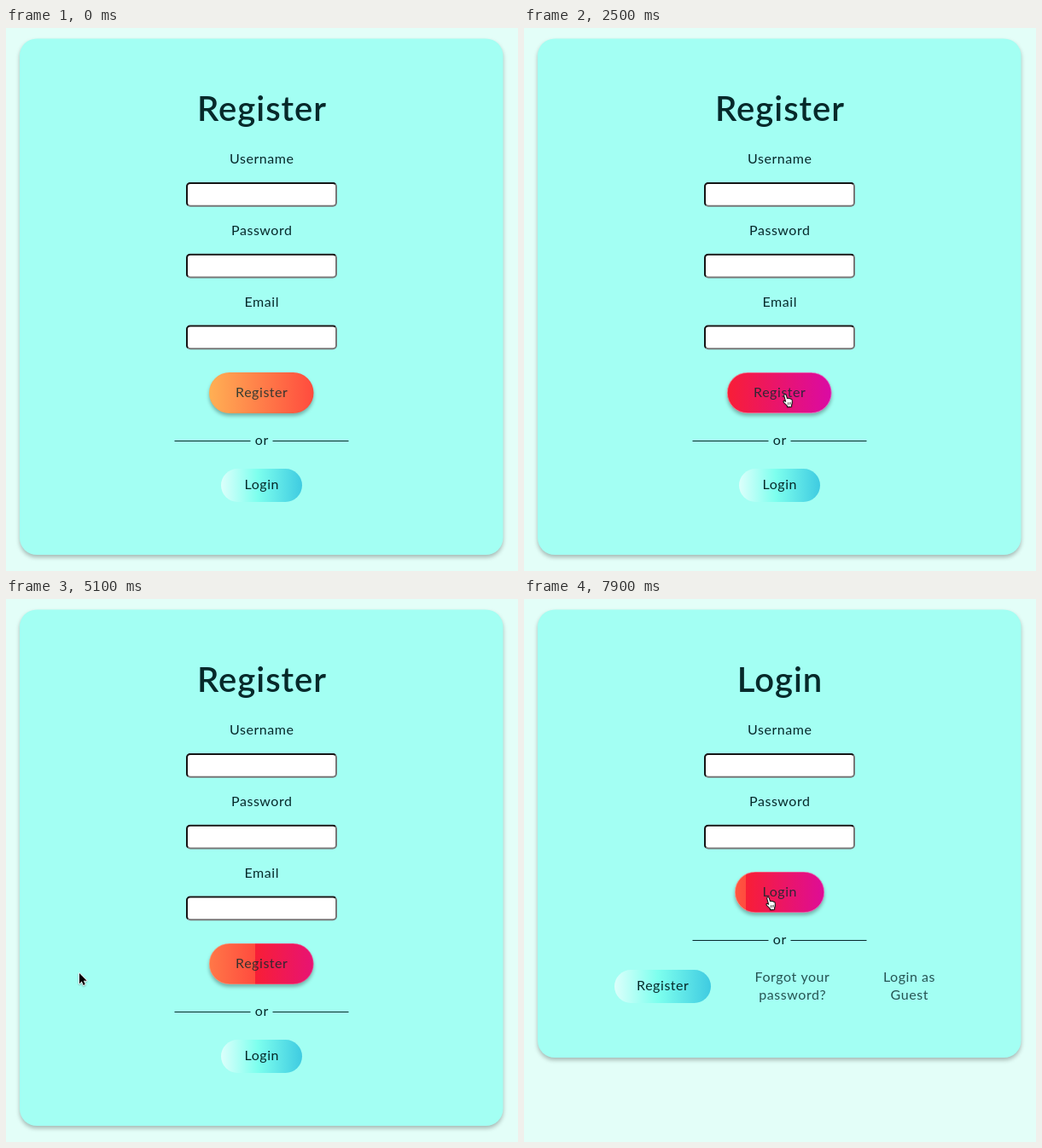
Animation of 600 by 637 pixels, one loop 8000 ms. Source, as an HTML page with a canvas:

```html
<!DOCTYPE html>
<html lang="en">
<head>
<meta charset="utf-8">
<title>Register and login</title>
<style>
  html, body { margin: 0; width: 100%; height: 100%; overflow: hidden; background: #e3fef8; }
  canvas { display: block; width: 600px; height: 637px; }
</style>
</head>
<body>
<canvas id="stage"></canvas>
<script>
const LOOP = 8000, STEP = 100, FADE = 500, SWITCH = 6600;
const INK = '#06292a', SOFT = 'rgba(6,41,42,.8)', MID = 299.5;
const canvas = document.getElementById('stage');
const ctx = canvas.getContext('2d');
const dpr = window.devicePixelRatio || 1;
canvas.width = 600 * dpr;
canvas.height = 637 * dpr;

// Pointer tip: time, x, y
const path = [
  [0, -30, 440], [200, -30, 445], [400, 290, 432], [870, 300, 432], [1200, -30, 442],
  [1800, -30, 445], [2095, 300, 432], [2400, 307, 430], [2750, 307, 430], [3150, -30, 442],
  [3700, -30, 446], [4000, 300, 433], [4900, 305, 432], [5100, 86, 439], [5400, 26, 448],
  [5550, 4, 455], [5600, 4, 458], [6050, 283, 533], [6850, 283, 533], [7607, 286, 368],
  [7700, 287, 350], [8000, 287, 350]
];
// Times at which the main button is entered and left
const hovers = [[350, 935], [2040, 2830], [3945, 4967], [7607, 9000]];

// The CSS "ease" curve, cubic-bezier(.25, .1, .25, 1)
function ease(x) {
  if (x <= 0) return 0;
  if (x >= 1) return 1;
  const bez = (a, b, s) => 3 * a * s * (1 - s) ** 2 + 3 * b * s * s * (1 - s) + s ** 3;
  let lo = 0, hi = 1;
  for (let i = 0; i < 24; i++) {
    const m = (lo + hi) / 2;
    if (bez(.25, .25, m) < x) lo = m; else hi = m;
  }
  return bez(.1, 1, lo);
}

function sweepAt(t) {
  const h = hovers.filter(v => v[0] <= t).pop();
  if (!h) return 0;
  return t < h[1] ? ease((t - h[0]) / FADE) : 1 - ease((t - h[1]) / FADE);
}

function pointerAt(t) {
  const i = path.findIndex(k => k[0] > t);
  const a = path[i - 1], b = path[i];
  const f = (t - a[0]) / (b[0] - a[0]);
  return { x: a[1] + (b[1] - a[1]) * f, y: a[2] + (b[2] - a[2]) * f };
}

function box(x, y, w, h, r, fill) {
  ctx.beginPath();
  ctx.roundRect(x, y, w, h, r);
  ctx.fillStyle = fill;
  ctx.fill();
}

function shadowBox(x, y, w, h, r, fill, blur, alpha) {
  ctx.save();
  ctx.shadowColor = `rgba(0,0,0,${alpha})`;
  ctx.shadowBlur = blur * dpr;
  ctx.shadowOffsetY = 3 * dpr;
  box(x, y, w, h, r, fill);
  ctx.restore();
}

function ramp(x0, x1, stops) {
  const g = ctx.createLinearGradient(x0, 0, x1, 0);
  stops.forEach(([p, c]) => g.addColorStop(p, c));
  return g;
}

function write(s, x, y, size, weight, gap, color) {
  ctx.font = `${weight} ${size}px Lato, "Open Sans", sans-serif`;
  ctx.letterSpacing = gap + 'px';
  ctx.textAlign = 'center';
  ctx.fillStyle = color;
  ctx.fillText(s, x + gap / 2, y);
}

const label = (s, x, y, color = INK) => write(s, x, y, 16, 400, .55, color);
const heading = s => write(s, MID, 108.5, 40, 600, 1, INK);

function field(name, y) {
  label(name, MID, y);
  const x = 211, top = y + 22, w = 177, h = 28.7;
  box(x, top, w, h, 5, '#777');
  ctx.save();
  ctx.beginPath();
  ctx.moveTo(x, top);
  ctx.lineTo(x + w, top);
  ctx.lineTo(x + w - h / 2, top + h / 2);
  ctx.lineTo(x + h / 2, top + h / 2);
  ctx.lineTo(x, top + h);
  ctx.clip();
  box(x, top, w, h, 5, '#151515');
  ctx.restore();
  box(x + 2, top + 2, w - 4, h - 4, 3, '#fff');
}

function mainButton(s, x, y, w, sweep) {
  const left = x - sweep * w;
  const fill = ramp(left, left + 2 * w, [
    [0, '#ffb054'], [.5, '#ff4b3e'], [.5, '#f81e36'], [1, '#da0aa5']
  ]);
  shadowBox(x, y, w, 48, 24, fill, 4, .3);
  // Pale rim while hovered
  ctx.beginPath();
  ctx.roundRect(x + .3, y + .3, w - .6, 47.4, 23.7);
  ctx.lineWidth = .8;
  ctx.strokeStyle = `rgba(225,255,250,${.5 * sweep})`;
  ctx.stroke();
  label(s, MID, y + 28.5, SOFT);
}

function pill(s, x, y, w, pressed) {
  ctx.save();
  if (pressed) ctx.translate(2, 2);
  box(x, y, w, 39, 19.5, ramp(x, x + w, [[0, '#dcfffb'], [.45, '#7dffee'], [1, '#3fcbe1']]));
  label(s, x + w / 2, y + 24);
  if (pressed) {
    ctx.lineWidth = 1;
    ctx.strokeStyle = 'rgba(255,255,255,.8)';
    ctx.strokeRect(x + 1.5, y + 1.5, w - 2, 37);
    ctx.lineWidth = 1.7;
    ctx.strokeStyle = '#26434e';
    ctx.beginPath();
    ctx.roundRect(x + .5, y + .5, w, 39.5, 2.5);
    ctx.stroke();
  }
  ctx.restore();
}

function divider(y) {
  ctx.fillStyle = INK;
  ctx.fillRect(197.5, y, 89, 1);
  ctx.fillRect(312.5, y, 89, 1);
  label('or', MID, y + 5);
}

function page(title, height) {
  ctx.fillStyle = '#e3fef8';
  ctx.fillRect(0, 0, 600, 637);
  shadowBox(16, 12.5, 566.5, height, 20, '#a3fff3', 5, .27);
  heading(title);
  field('Username', 159.1);
  field('Password', 242.8);
}

function registerPage(t) {
  page('Register', 605.5);
  field('Email', 326.5);
  mainButton('Register', 238, 404, 122.5, sweepAt(t));
  divider(484);
  pill('Login', 252, 517, 95, t >= 6200);
}

function loginPage(t) {
  page('Login', 525.5);
  mainButton('Login', 247, 320, 105, sweepAt(t));
  divider(400);
  pill('Register', 106, 435, 113);
  label('Forgot your', 314.2, 448.5, SOFT);
  label('password?', 314.5, 469.5, SOFT);
  label('Login as', 451.2, 448.5, SOFT);
  label('Guest', 451.5, 469.5, SOFT);
}

const arrow = new Path2D('M0 0V12.2L2.8 9.6L4.7 14L6.8 13.1L4.9 8.8H8.7Z');
const hand = new Path2D('M-2 1.2Q-2-.3-.7-.3Q.5-.3.9 1L2.1 5Q3.4 4.3 4.3 5.2Q5.6 4.6 6.4 5.8' +
  'Q8 5.4 8.3 7L8.6 10Q8.5 12 7.7 13.2V15.5L2.2 16V14.4L-1.7 10.6Q-3.4 8.8-2.4 8.1Q-1.5 7.6.2 9Z');
const knuckles = new Path2D('M3 10V13M5 9.8V12.8M6.8 9.6V12.4');

function pointer(t) {
  const { x, y } = pointerAt(t);
  if (x < -15) return;
  const inside = (l, top, w, h) => x >= l && x <= l + w && y >= top && y <= top + h;
  const over = t < SWITCH
    ? inside(238, 404, 123, 48) || inside(252, 517, 95, 39)
    : inside(247, 320, 105, 48);
  ctx.save();
  ctx.translate(x, y);
  ctx.lineJoin = 'round';
  ctx.shadowColor = 'rgba(0,0,0,.3)';
  ctx.shadowBlur = 2 * dpr;
  ctx.shadowOffsetY = dpr;
  if (over) {
    ctx.translate(-.5, 0);
    ctx.scale(.92, .92);
    ctx.fillStyle = '#fff';
    ctx.strokeStyle = '#111';
    ctx.lineWidth = 1.1;
    ctx.fill(hand);
    ctx.shadowColor = 'transparent';
    ctx.stroke(hand);
    ctx.lineWidth = .7;
    ctx.stroke(knuckles);
  } else {
    ctx.strokeStyle = '#fff';
    ctx.lineWidth = 1.6;
    ctx.stroke(arrow);
    ctx.shadowColor = 'transparent';
    ctx.fillStyle = '#000';
    ctx.fill(arrow);
  }
  ctx.restore();
}

function draw(now) {
  const t = Math.floor((now % LOOP) / STEP) * STEP;
  ctx.setTransform(dpr, 0, 0, dpr, 0, 0);
  (t < SWITCH ? registerPage : loginPage)(t);
  pointer(t);
}

const start = performance.now();
function tick() {
  draw(performance.now() - start);
  requestAnimationFrame(tick);
}
tick();
</script>
</body>
</html>
```
